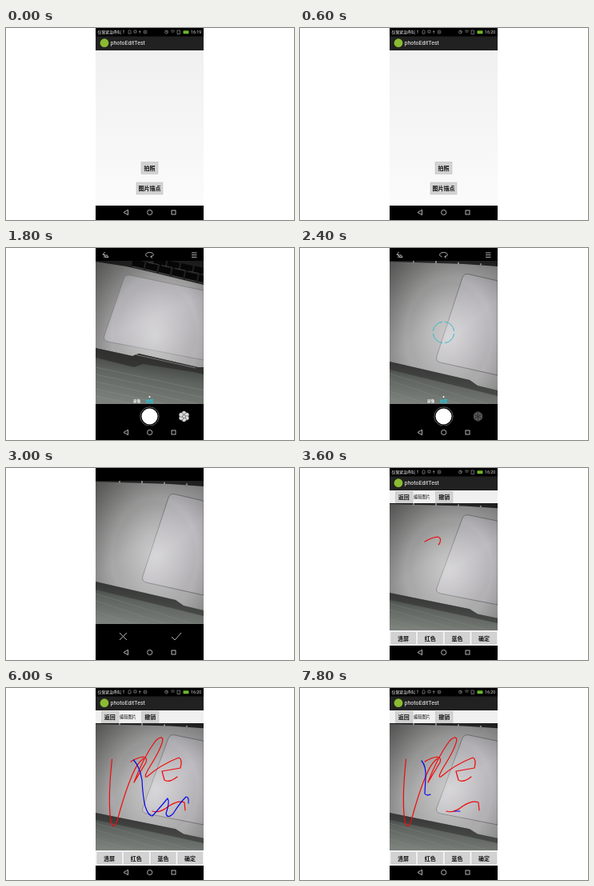
Recreate the animation shown at these times as an HTML page. Size 360 by 240 pixels, loop 8 s.

```html
<!DOCTYPE html>
<html lang="zh">
<head>
<meta charset="utf-8">
<style>
html, body { margin: 0; width: 100%; height: 100%; overflow: hidden; background: #fff; }
svg { display: block; width: 100vw; height: 100vh; }
text { font: 7px "Noto Sans CJK SC", "Noto Sans CJK", sans-serif; }
.latin { font-family: Roboto, sans-serif; }
.clock { font-size: 5.3px; fill: #ddd; }
.small { font-size: 4.8px; font-weight: 700; }
.btn text { font-weight: 700; fill: #111; text-anchor: middle; }
.btn rect { fill: #d2d2d2; stroke: #bcbcbc; stroke-width: .5; }
.line { fill: none; stroke: #ddd; stroke-width: .8; }
.ink { fill: none; stroke: #f00808; stroke-width: 1.2; stroke-linecap: round; stroke-linejoin: round; }
.blue { stroke: #0808e8; }

.step { animation: 8s step-end infinite; }
.bars { animation-name: bars; }
.before { animation-name: before; }
.after { animation-name: after; }
.home { animation-name: home; }
.camera { animation-name: camera; }
.aim { animation-name: aim; }
.focus { animation-name: focus; }
.shot { animation-name: shot; }
.review { animation-name: review; }
.edit { animation-name: edit; }
.scrawl { stroke-dasharray: 101; animation-name: scrawl; }
.hook { animation-name: hook; }
.wave { animation-name: wave; }
.redo { animation-name: redo; }
.dash { animation-name: dash; }
@keyframes bars { 0%, 45% { opacity: 1 } 15% { opacity: 0 } }
@keyframes before { 0% { opacity: 1 } 7.5%, 100% { opacity: 0 } }
@keyframes after { 0% { opacity: 0 } 7.5%, 100% { opacity: 1 } }
@keyframes home { 0% { opacity: 1 } 15%, 100% { opacity: 0 } }
@keyframes camera { 0%, 37.5%, 100% { opacity: 0 } 22.5% { opacity: 1 } }
@keyframes aim { 0%, 30%, 100% { opacity: 0 } 22.5% { opacity: 1 } }
@keyframes focus { 0%, 37.5%, 100% { opacity: 0 } 30% { opacity: 1 } }
@keyframes shot { 0%, 45%, 100% { opacity: 0 } 30% { opacity: 1 } }
@keyframes review { 0%, 45%, 100% { opacity: 0 } 37.5% { opacity: 1 } }
@keyframes edit { 0% { opacity: 0 } 45%, 100% { opacity: 1 } }
@keyframes scrawl { 0%, 45% { stroke-dashoffset: 91 } 52.5% { stroke-dashoffset: 45 } 60%, 100% { stroke-dashoffset: 0 } }
@keyframes hook { 0% { opacity: 0 } 67.5%, 100% { opacity: 1 } }
@keyframes wave { 0%, 82.5%, 100% { opacity: 0 } 75% { opacity: 1 } }
@keyframes redo { 0% { opacity: 0 } 90%, 100% { opacity: 1 } }
@keyframes dash { 0% { opacity: 0 } 97.5%, 100% { opacity: 1 } }
</style>
</head>
<body>
<svg viewBox="0 0 360 240" preserveAspectRatio="none">
  <defs>
    <linearGradient id="page" x2="0" y2="1">
      <stop stop-color="#f0f0f0"/><stop offset="1" stop-color="#fbfbfb"/>
    </linearGradient>
    <linearGradient id="metal" x2=".6" y2="1">
      <stop stop-color="#7d7d7c"/><stop offset=".5" stop-color="#a9a8a8"/><stop offset="1" stop-color="#acabab"/>
    </linearGradient>
    <linearGradient id="pad" x2=".5" y2="1">
      <stop stop-color="#a4a3a6"/><stop offset=".6" stop-color="#bebcc0"/><stop offset="1" stop-color="#b3b1b4"/>
    </linearGradient>
    <linearGradient id="desk" x1=".6" y1="0" x2=".3" y2="1">
      <stop offset=".1" stop-color="#343634"/><stop offset=".5" stop-color="#5f6460"/><stop offset="1" stop-color="#7c817c"/>
    </linearGradient>
    <radialGradient id="glow" cx=".55" cy=".52" r=".8">
      <stop stop-color="#fff" stop-opacity=".4"/><stop offset=".45" stop-color="#fff" stop-opacity="0"/>
      <stop offset=".5" stop-opacity="0"/><stop offset="1" stop-opacity=".4"/>
    </radialGradient>
    <clipPath id="view"><path d="M112 16H247V195H112Z"/></clipPath>
    <path id="frame" d="M112 16H247V195H112Z"/>
    <g id="photo" clip-path="url(#view)">
      <use href="#frame" fill="url(#metal)"/>
      <path d="M112 16H247V23L205 20L112 17Z" fill="#2a2a2a"/>
      <path d="M141 17L247 23" stroke="#999" stroke-width="5" stroke-dasharray="2 26"/>
      <path d="M247 41L210 32.500Q205 32 203 37L171 135Q169 141 175 143L247 159Z" fill="url(#pad)" stroke="#5c5b60" stroke-width=".7"/>
      <use href="#frame" fill="url(#glow)"/>
      <path d="M112 142L212 165L222 172L247 178V195H112Z" fill="url(#desk)"/>
      <path d="M112 142L212 165L222 172L247 178V185L219 178L112 152Z" fill="#333" fill-opacity=".6"/>
      <path d="M112 166L200 195M112 179L160 195M112 157L235 195" stroke="#8d938e" stroke-opacity=".3" fill="none"/>
    </g>
  </defs>

  <rect x="112" width="135" height="240"/>

  <g class="step home">
    <rect x="112" y="28" width="135" height="194" fill="url(#page)"/>
    <g class="btn">
      <rect x="169" y="167.5" width="21" height="15"/><text x="179.5" y="177.7">拍照</text>
      <rect x="163" y="193" width="33" height="15"/><text x="179.5" y="203.2">图片描点</text>
    </g>
  </g>

  <g class="step aim" clip-path="url(#view)">
    <use href="#frame" fill="url(#metal)"/>
    <path d="M112 16H247V46L181 30L150 23L112 17Z" fill="#252424"/>
    <path d="M158 18L247 39M185 16L247 29" stroke="#070707" stroke-width="8" stroke-dasharray="15 2"/>
    <path d="M158 23L247 44M178 18L247 33" stroke="#777" stroke-width=".5" stroke-dasharray="14 3"/>
    <path d="M247 53L155 34Q149 33 147 39L123 109Q121 115 127 117L247 140Z" fill="url(#pad)" stroke="#77767a" stroke-width=".6"/>
    <use href="#frame" fill="url(#glow)"/>
    <path d="M112 125L158 135L166 132L240 149H247V195H112Z" fill="url(#desk)"/>
    <path d="M112 125L158 135L166 132L240 149H247V158L234 155L171 145L160 149L112 137Z" fill="#2c2b2b" fill-opacity=".75"/>
    <path d="M163 133.500L237 150" stroke="#777" stroke-width="1"/>
    <path d="M112 149L247 178M112 158L247 187M112 167L240 195M112 176L198 195M112 185L157 195" stroke="#949c96" stroke-opacity=".3" fill="none"/>
  </g>

  <use class="step shot" href="#photo"/>

  <g class="step camera">
    <g class="line">
      <path d="M123.500 5L121 8.500H124L122.500 12M124 11.500L126 8.500L128 11.500Z"/>
      <path d="M177.500 11C173 10 174 5.500 179.500 5.500S186 10 181 11M182.500 9.300L180.700 11L182.500 12.500"/>
      <path d="M232 6H238.500M232 8.700H238.500M232 11.400H238.500"/>
    </g>
    <circle cx="179.500" cy="186" r="1" fill="#fff"/>
    <text class="small" x="158.700" y="193" fill="#eee">录像</text>
    <text class="small" x="174.700" y="193" fill="#20c8dc">拍照</text>
    <circle cx="179.500" cy="210.500" r="10" fill="#fff"/>
    <circle cx="179.500" cy="210.500" r="11.700" fill="none" stroke="#8a8a8a" stroke-width=".7"/>
  </g>
  <g class="step aim" fill="#ddd" stroke="#333" stroke-width=".5">
    <circle cx="222.500" cy="206.500" r="2.800"/><circle cx="226" cy="208.500" r="2.800"/>
    <circle cx="226" cy="212.500" r="2.800"/><circle cx="222.500" cy="214.500" r="2.800"/>
    <circle cx="219" cy="212.500" r="2.800"/><circle cx="219" cy="208.500" r="2.800"/>
    <circle cx="222.500" cy="210.500" r="2"/>
  </g>
  <g class="step focus">
    <path d="M222.500 204L228 207.300V213.700L222.500 217L217 213.700V207.300Z" fill="#555"/>
    <path d="M217 207.300L228 213.700M228 207.300L217 213.700M222.500 204V217" stroke="#222" stroke-width=".7"/>
    <circle cx="179.500" cy="105.500" r="13.300" fill="none" stroke="#35b9cc" pathLength="80" stroke-dasharray="17 3" stroke-dashoffset="-1.500"/>
  </g>
  <g class="step review">
    <path class="line" d="M142 206L151 215M151 206L142 215M207 211L211 215L219 206"/>
  </g>

  <g class="step edit">
    <rect x="112" y="28" width="135" height="194" fill="#f0f0f1"/>
    <use href="#photo" transform="translate(0 29.800) scale(1 .888)"/>
    <g class="btn">
      <rect x="119.500" y="29.500" width="21.500" height="14"/><text x="129.800" y="39.200">返回</text>
      <rect x="169.500" y="29.500" width="21.500" height="14"/><text x="180.200" y="39.200">撤销</text>
      <rect x="114" y="205.500" width="30.500" height="14.500"/><text x="129" y="215.500">清屏</text>
      <rect x="147.700" y="205.500" width="30.500" height="14.500"/><text x="162.700" y="215.500">红色</text>
      <rect x="181.400" y="205.500" width="30.500" height="14.500"/><text x="196.400" y="215.500">蓝色</text>
      <rect x="215" y="205.500" width="30.500" height="14.500"/><text x="230" y="215.500">确定</text>
    </g>
    <text x="142" y="38.300" style="font-size:5.200px;font-weight:500" fill="#111">编辑图片</text>
    <path class="ink step scrawl" pathLength="100" d="M156 92Q164 87 172 86Q177 87 175 93L160 118Q172 86 187 66Q194 59 196 64Q195 74 180 98Q171 113 176 111Q193 96 216 87Q221 89 218 100L195 104L198 115Q204 119 214 111"/>
    <g class="step hook">
      <path class="ink" d="M132.500 89Q127 140 131 166Q134 179 139 166Q150 125 160 104Q165 93 172 88"/>
      <path class="ink" d="M183 154Q192 157 203 148Q215 140 223 143L224 153"/>
    </g>
    <path class="ink blue step wave" d="M159.500 90Q167 98 170 115Q171 136 174 148Q178 160 183 160Q192 150 202 138Q205 142 200 157Q202 164 209 157Q217 144 225 136Q229 136 228 144"/>
    <path class="ink blue step redo" d="M152 91Q158 98 157 112L156 132Q158 135 163 133"/>
    <path class="ink blue step dash" d="M193 154H200"/>
  </g>

  <g class="step bars">
    <rect x="112" width="135" height="10.500"/>
    <rect x="112" y="10.500" width="135" height="17.500" fill="#212121"/>
    <circle cx="123" cy="18.700" r="5.400" fill="#8bbb32"/>
    <text class="latin" x="130.500" y="21.300" fill="#f2f2f2">photoEditTest</text>
    <text x="114.500" y="7.200" style="font-size:4.900px;font-weight:500" fill="#eee">仅限紧急呼叫</text>
    <g class="line" style="stroke:#aaa;stroke-width:.6">
      <path d="M147 3V7M146 4L147 3L148 4M153 3.500L154.500 2.500L156 3.500V7H153ZM160 3H163V6H160ZM166 4.500H168.500M167.200 3V7"/>
      <circle cx="174" cy="5" r="2"/><path d="M173 5H175"/>
      <circle cx="200.500" cy="5" r="2"/><path d="M200.500 3.500V5H202M206 4Q208.500 1.500 211 4M207 5.500Q208.500 4 210 5.500M214 3H217.500V7.500H214Z"/>
    </g>
    <rect x="221.500" y="3.200" width="7" height="4" rx=".6" fill="#6db52c"/>
    <text class="latin clock" x="231" y="7.300">16:</text>
    <text class="latin clock step before" x="238.200" y="7.300">19</text>
    <text class="latin clock step after" x="238.200" y="7.300">20</text>
  </g>

  <g class="line">
    <rect x="112" y="222" width="135" height="18" fill="#000" stroke="none"/>
    <path d="M152.500 227.300V233.700L147 230.500Z"/>
    <circle cx="179.700" cy="230.500" r="3.100"/>
    <rect x="207" y="228" width="5" height="5"/>
  </g>
</svg>
</body>
</html>
```
